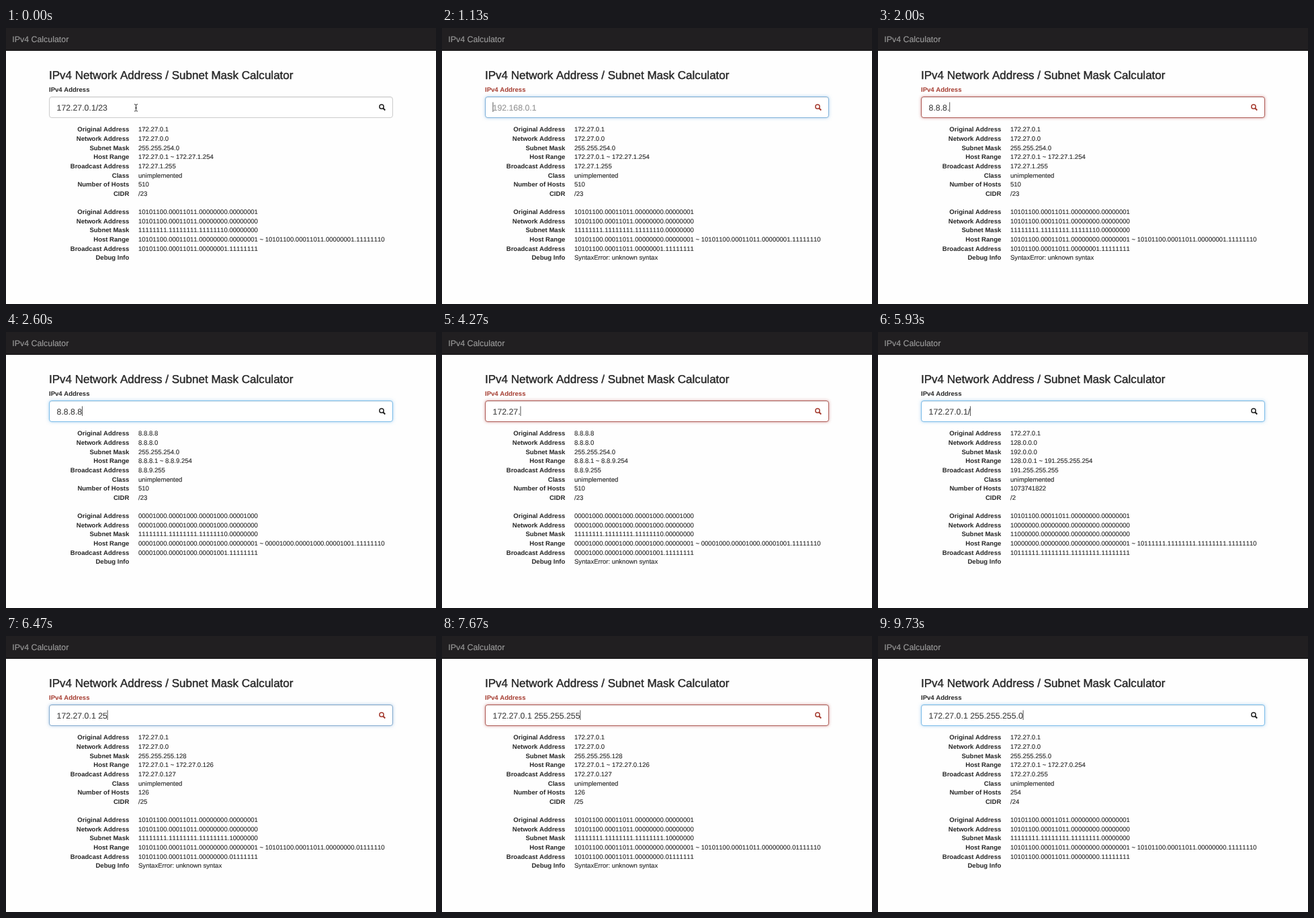
These frames come from a looping animation (640x411 px, 9.99 s). An HTML page:

```html
<!DOCTYPE html>
<html lang="en">
<head>
<meta charset="utf-8">
<title>IPv4 Calculator</title>
<style>
  html, body { margin: 0; width: 100%; height: 100%; overflow: hidden; background: #fefefe; }
  #nav {
    position: absolute; width: 100%; height: 34px; box-sizing: border-box;
    background: #211f21; border-bottom: 1px solid #0c0b0c;
  }
  #box {
    position: absolute; left: 64px; top: 102px; width: 512px; height: 32px;
    box-sizing: border-box; border: 1px solid; border-radius: 4px; background: #fff;
  }
  svg { position: absolute; left: 0; top: 0; }
  text {
    font: 9.56px "Liberation Sans", Arial, sans-serif; font-kerning: none;
    text-rendering: geometricPrecision; white-space: pre;
    fill: #262626; stroke: #262626; stroke-width: .12px;
  }
  .label { font-weight: bold; stroke-width: 0; }
  .row { text-anchor: end; }
  .brand { font-size: 12.4px; fill: #9d9d9d; stroke: #9d9d9d; }
  .title { font-size: 17.05px; stroke-width: .4px; }
  #entry { font-size: 12.3px; }
</style>
</head>
<body>
<div id="nav"></div>
<div id="box"></div>
<svg id="page" width="640" height="411">
  <text class="brand" x="9.3" y="20.6">IPv4 Calculator</text>
  <text class="title" x="64" y="76">IPv4 Network Address / Subnet Mask Calculator</text>
  <text class="label" id="caption" x="64" y="95.2">IPv4 Address</text>
  <rect id="selection" x="76" y="111" height="14" fill="#b3d7fe"/>
  <text id="entry" x="75.6" y="122.5"></text>
  <rect id="caret" y="110.5" width="1" height="14.5" fill="#555"/>
  <g id="lens" fill="none" stroke-width="1.5">
    <circle cx="559" cy="117.2" r="3.1"/>
    <path d="M561.3 119.500l3 3" stroke-width="2"/>
  </g>
  <path id="mouse" fill="none" stroke="#333"
    d="M191 113.5q2.5 0 2.5 1.5v7.5q0 1.5-2.5 1.5M196 113.5q-2.5 0-2.5 1.5M196 124q-2.5 0-2.5-1.5M192 119h3"/>
</svg>
<script>
const LOOP = 9990, CHECK_DELAY = 60, FADE_DELAY = 45, FADE = 150;
const $ = id => document.getElementById(id);

// Input history: [time, text]
const typed = (base, added, times) =>
  times.map((time, i) => [time, base + added.slice(0, i + 1)]);
const history = [
  [0, '172.27.0.1/23'],
  [1000, ''],
  ...typed('', '8.8.8.8', [1470, 1530, 1600, 1730, 1800, 2000, 2200]),
  [3400, ''],
  ...typed('', '172.27.0.1', [3530, 3600, 3730, 3870, 4000, 4130, 4270, 4400, 4470, 4600]),
  [5070, '172.27.0.1/24'],
  [5870, '172.27.0.1/2'],
  [5930, '172.27.0.1/'],
  ...typed('172.27.0.1/', '25', [6000, 6070]),
  [6270, '172.27.0.1'],
  ...typed('172.27.0.1', ' 255.255.255.0',
    [6330, 6400, 6470, 6530, 6600, 6730, 6870, 6930, 7070, 7130, 7270, 7670, 7730, 7870])
];
const selected = [[470, 1000], [3070, 3400]];
const caretOff = [[2870, 3070], [5330, 5650], [8470, 9000], [9470, 9730]];

// Address arithmetic
const octets = n => [24, 16, 8, 0].map(shift => n >>> shift & 255);
const dotted = n => octets(n).join('.');
const binary = n => octets(n).map(o => o.toString(2).padStart(8, '0')).join('.');
const parse = s => s.split('.').reduce((n, o) => (n << 8 | o) >>> 0, 0);

function calculate(address, bits) {
  const mask = -1 << 32 - bits, net = address & mask, last = net | ~mask;
  const common = show => [
    show(address), show(net), show(mask), `${show(net + 1)} ~ ${show(last - 1)}`, show(last)
  ];
  return [...common(dotted), 'unimplemented', 2 ** (32 - bits) - 2, '/' + bits, ...common(binary)];
}

// Validated states and border changes follow from the history
const checks = [], borders = [[-LOOP, 'plain'], [70, 'focus']];
let bits = 23, results, wasError = false;
for (const [time, text] of history) {
  const match = text.match(/^(\d+(?:\.\d+){3})(?:\/(\d*)| (\d+(?:\.\d+){3}))?$/);
  const error = !match;
  if (match) {
    const [, address, length, mask] = match;
    if (length) bits = +length;
    if (mask) bits = binary(parse(mask)).split('1').length - 1;
    results = calculate(parse(address), bits);
  }
  const at = time && time + CHECK_DELAY;
  checks.push([at, { error, results }]);
  if (error !== wasError) borders.push([at + FADE_DELAY, error ? 'error' : 'focus']);
  wasError = error;
}

// Border rgb, glow rgba, glow blur
const looks = {
  plain: [204, 204, 204, 102, 175, 233, 0, 5.5],
  focus: [122, 187, 232, 102, 175, 233, .5, 5.5],
  error: [174, 92, 86, 206, 132, 131, .8, 4.1]
};

function addText(x, y, text, className) {
  const node = document.createElementNS('http://www.w3.org/2000/svg', 'text');
  node.setAttribute('x', x);
  node.setAttribute('y', y);
  node.setAttribute('class', className);
  node.textContent = text;
  return $('page').appendChild(node);
}
const addresses = ['Original Address', 'Network Address', 'Subnet Mask', 'Host Range', 'Broadcast Address'];
const names = [...addresses, 'Class', 'Number of Hosts', 'CIDR', ...addresses, 'Debug Info'];
const values = names.map((name, i) => {
  const y = 154.2 + 13.66 * (i < 8 ? i : i + 1);
  addText(183.3, y, name, 'label row');
  return addText(197, y, '', '');
});

const indexAt = (list, t) => list.findLastIndex(([time]) => time <= t);
const within = (spans, t) => spans.some(([from, to]) => t >= from && t < to);
const show = (id, visible) => $(id).setAttribute('visibility', visible ? 'visible' : 'hidden');

function drawBorder(t) {
  const i = indexAt(borders, t);
  const u = Math.min(1, (t - borders[i][0]) / FADE), k = u * u * (3 - 2 * u);
  const from = looks[borders[Math.max(0, i - 1)][1]], to = looks[borders[i][1]];
  const [r, g, b, ...glow] = from.map((v, j) => v + (to[j] - v) * k);
  const blur = glow.pop();
  $('box').style.borderColor = `rgb(${r}, ${g}, ${b})`;
  $('box').style.boxShadow =
    `inset 0 1px 1px rgba(0, 0, 0, .075), 0 0 ${blur}px rgba(${glow})`;
}

function draw(now) {
  const t = (now + 4) % LOOP;
  const text = history[indexAt(history, t)][1];
  const { error, results } = checks[indexAt(checks, t)][1];
  const entry = $('entry');

  entry.textContent = text || '192.168.0.1';
  entry.style.fill = entry.style.stroke = text ? '#404040' : '#959595';
  const width = text ? entry.getComputedTextLength() : 0;
  $('caret').setAttribute('x', 75.4 + width);
  $('selection').setAttribute('width', width);
  show('selection', within(selected, t));
  show('caret', t >= 70 && !within(selected, t) && !within(caretOff, t));
  show('mouse', t < 1000);

  $('caption').style.fill = error ? '#a53c30' : '';
  $('lens').setAttribute('stroke', error ? '#a53c30' : '#222');
  [...results, error ? 'SyntaxError: unknown syntax' : '']
    .forEach((value, i) => values[i].textContent = value);
  drawBorder(t);
  requestAnimationFrame(draw);
}
requestAnimationFrame(draw);
</script>
</body>
</html>
```
